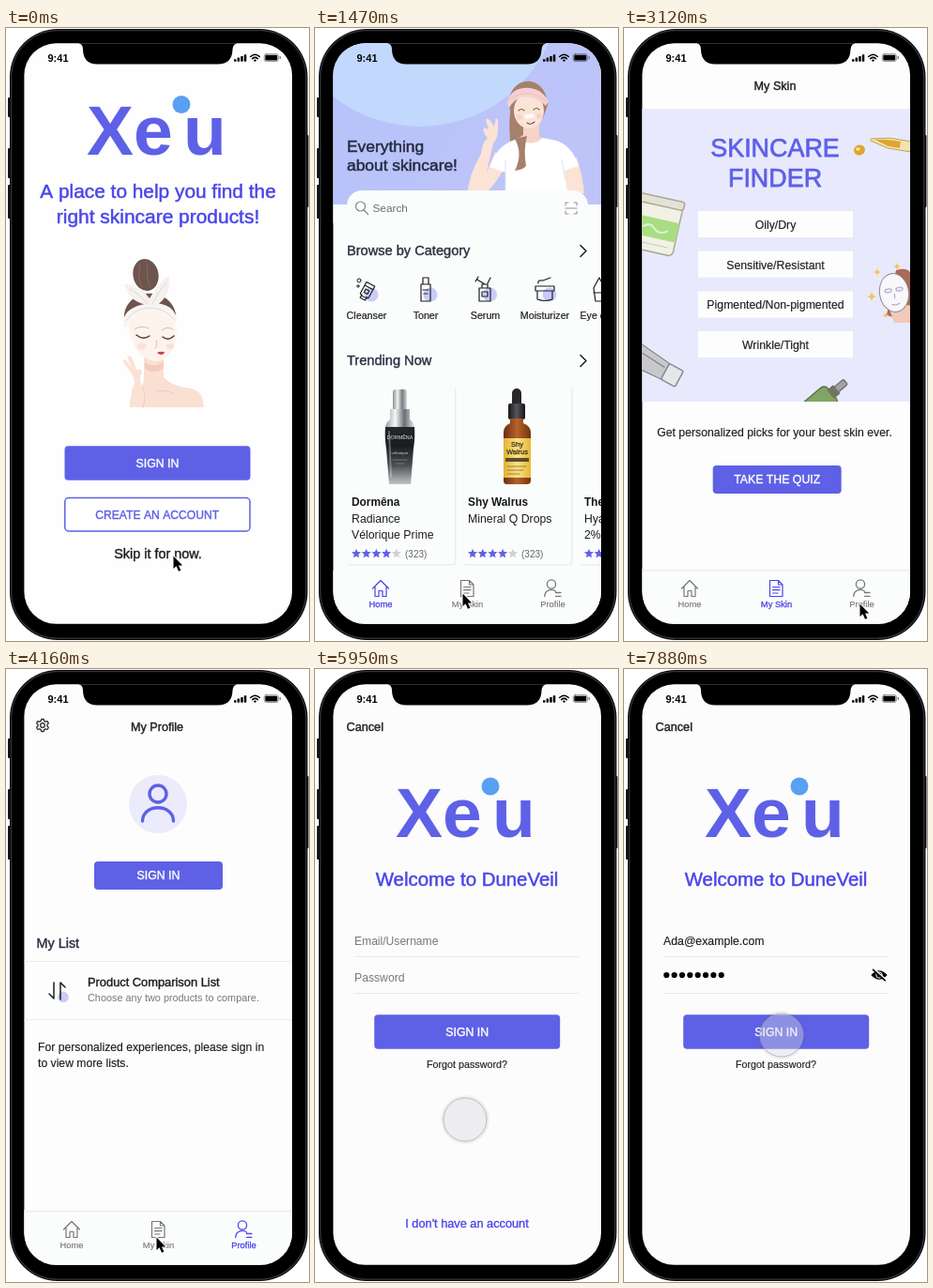
These frames come from a looping animation (323 by 653 pixels, 8 s). An HTML page with a canvas:

```html
<!DOCTYPE html>
<html lang="en">
<head>
<meta charset="utf-8">
<title>Skincare app walkthrough</title>
<style>
html, body { margin: 0; width: 100%; height: 100%; overflow: hidden; background: #fff; }
canvas { display: block; width: 100vw; height: 100vh; }
</style>
</head>
<body>
<canvas id="stage"></canvas>
<script>
const W = 323, H = 653, LOOP = 8000, MID = 162;
const BLUE = '#5e61e6', LINK = '#4a46ea', INK = '#1d1e24', SLATE = '#2c3040', GREY = '#77787d';
const SKIN = '#fbe3d6', LAVENDER = '#c9cbfa', PAPER = '#fbfcfc';
const canvas = document.getElementById('stage');
const ctx = canvas.getContext('2d');
const scale = Math.max(1, window.devicePixelRatio || 1);
canvas.width = W * scale;
canvas.height = H * scale;

// Drawing helpers
function fill(d, color) {
  ctx.fillStyle = color;
  ctx.fill(new Path2D(d));
}
function line(d, color = INK, width = 1.2) {
  ctx.strokeStyle = color;
  ctx.lineWidth = width;
  ctx.lineCap = ctx.lineJoin = 'round';
  ctx.stroke(new Path2D(d));
}
function box(x, y, w, h, r, color, border, width = 1.5) {
  ctx.beginPath();
  ctx.roundRect(x, y, w, h, r);
  if (color) { ctx.fillStyle = color; ctx.fill(); }
  if (border) { ctx.strokeStyle = border; ctx.lineWidth = width; ctx.stroke(); }
}
function oval(x, y, rx, ry, color, turn = 0) {
  ctx.beginPath();
  ctx.ellipse(x, y, rx, ry, turn, 0, Math.PI * 2);
  ctx.fillStyle = color;
  ctx.fill();
}
const dot = (x, y, r, color) => oval(x, y, r, r, color);
function ring(x, y, r, color, width) {
  ctx.beginPath();
  ctx.arc(x, y, r, 0, Math.PI * 2);
  ctx.strokeStyle = color;
  ctx.lineWidth = width;
  ctx.stroke();
}
// "weight" thickens the regular face towards medium
function text(s, x, y, size, color = INK, { weight = 0, bold = false, align = 'left' } = {}) {
  ctx.font = `${bold ? 'bold ' : ''}${size}px "Liberation Sans", Arial, sans-serif`;
  ctx.textAlign = align;
  ctx.fillStyle = ctx.strokeStyle = color;
  ctx.fillText(s, x, y);
  if (weight) {
    ctx.lineWidth = weight;
    ctx.lineJoin = 'round';
    ctx.strokeText(s, x, y);
  }
}
const centered = (s, y, size, color, weight = 0, x = MID) => text(s, x, y, size, color, { weight, align: 'center' });
function placed(x, y, turn, draw) {
  ctx.save();
  ctx.translate(x, y);
  ctx.rotate(turn);
  draw();
  ctx.restore();
}
function gradient(x0, y0, x1, y1, ...colors) {
  const g = ctx.createLinearGradient(x0, y0, x1, y1);
  colors.forEach((c, i) => g.addColorStop(i / (colors.length - 1), c));
  return g;
}
const page = color => box(19, 16, 286, 619, 0, color);
function button(x, y, w, h, label) {
  box(x, y, w, h, 4, BLUE);
  centered(label, y + h / 2 + 4.4, 12.3, '#fff', 0.4, x + w / 2);
}
function wordmark(baseline) {
  text('Xe', 86, baseline, 75, BLUE, { bold: true });
  text('u', 189, baseline, 75, BLUE, { bold: true });
  dot(187, baseline - 53.5, 9.5, '#58a0f1');
}

// Phone shell
function shell() {
  for (const [x, y, h] of [[2, 74, 21], [2, 128, 32], [2, 167, 36], [319, 114, 77]]) box(x, y, 3.5, h, 1, '#15151b');
  box(4, 1, 317.5, 651, 51, '#08080b');
  box(5.7, 2.7, 314, 647.5, 49.5, '#000', '#34343d', 1.2);
}
function statusBar() {
  fill('M78 15H246V16.4Q242 17 241.5 23Q241 38.5 226 38.5H97Q82.5 38.5 82 23Q82 17 78 16.4Z', '#000');
  text('9:41', 44.5, 36, 11, '#000', { bold: true });
  for (let i = 0; i < 4; i++) box(243 + i * 3.6, 33.3 - i * 1.7, 2.5, 2.4 + i * 1.7, 0.6, '#000');
  line('M260.7 30.5Q265.5 26 270.3 30.5M262.7 32.7Q265.5 30.2 268.3 32.7', '#000', 1.6);
  dot(265.5, 34.6, 1.2, '#000');
  ctx.globalAlpha = 0.4;
  box(275.2, 27.7, 15.2, 7.8, 2.2, null, '#000', 1);
  ctx.globalAlpha = 1;
  box(276.3, 28.8, 13, 5.6, 1, '#000');
  box(291.6, 30, 1.3, 3.2, 0.6, '#777');
}
function tabs(active, edge = true) {
  box(19, 578, 286, 57, 0, PAPER);
  if (edge) box(19, 576, 286, 2.5, 0, gradient(0, 576, 0, 578.5, '#fcfcfc', '#e9e9eb'));
  const tint = i => i === active ? LINK : GREY;
  line('M61.5 597L70 588.5L78.5 597M64 595.5V605.5H68V599.5H72V605.5H76V595.5', tint(0), 1.2);
  line('M155.5 588.5H164.5L169 593V605.5H155.5ZM164.5 588.5V593H169M158.5 595.5H166M158.5 598.7H166M158.5 602H164', tint(1), 1.2);
  ring(252, 592.5, 4.6, tint(2), 1.3);
  line('M244.8 605.5C245 597.5 253 597.5 256.5 600M256.5 601.5H262M256.5 605.3H262', tint(2), 1.3);
  ['Home', 'My Skin', 'Profile'].forEach((s, i) => centered(s, 616.5, 9.4, tint(i), i === active ? 0.3 : 0.15, [70, 162.5, 253.5][i]));
}

// Welcome
function bunLady() {
  oval(149, 263, 13.5, 17, '#6d544c', -0.2);
  line('M143 252Q139 266 145 276M151 251Q149 265 153 276', '#846a61', 1);
  fill('M126 310C125 291 142 281 157 283C173 285 183 298 181 312Z', '#6d544c');
  fill('M147 348H168V372Q177 382 197 384Q210 386 211 404H132Q131 390 139 385Q147 382 147 372Z', '#fae0d2');
  fill('M148 356Q158 363 168 355V362Q159 370 148 363Z', '#f2cdbd');
  fill('M131 316C133 304 144 301 156 301C170 301 182 310 182 326C182 342 170 355 160 355C146 355 131 338 131 316Z', '#fef3ec');
  fill('M125 316Q124 302 140 296Q161 289 175 298Q183 304 182 316Q169 302 151 305Q135 307 128 321Z', '#f9f5f2');
  fill('M150 295Q130 291 126 272Q143 274 153 288Q165 268 174 264Q177 284 160 296Z', '#f6f1ee');
  line('M132 278Q143 284 151 294M171 271Q162 281 156 294M128 312Q136 299 152 298Q170 298 180 311', '#d9d0cd', 0.8);
  line('M139 327Q146 333 153 328M167 329Q173 334 179 328', '#4b3a38', 1.4);
  line('M137 321Q144 316 152 320M166 322Q172 317 178 321M160 333Q162 339 159 341', '#c9afa2', 0.8);
  oval(145, 339, 5, 3.5, 'rgba(246,180,170,.3)');
  oval(175, 339, 4, 3, 'rgba(246,180,170,.3)');
  fill('M161 346Q164 344 166 345Q168 344 169 346Q166 350 161 346Z', '#cf3f49');
  fill('M134 385Q139 378 135 370L125 356Q124 352 128 354L134 362L129 350Q132 347 135 353L139 364Q146 362 145 368Q140 372 146 383Q150 393 146 404H133Z', '#fbe2d5');
  line('M146 383Q150 393 146 404M161 387Q172 385 178 389', '#edc5b5', 0.8);
}
function welcome() {
  page('#fefefe');
  wordmark(135);
  centered('A place to help you find the', 181, 20.85, LINK, 0.5);
  centered('right skincare products!', 208, 20.95, LINK, 0.5);
  bunLady();
  button(62.5, 445.2, 198, 36.6, 'SIGN IN');
  box(62.8, 500.6, 197.2, 35.4, 4, '#fff', BLUE);
  centered('CREATE AN ACCOUNT', 522.7, 12.15, BLUE, 0.4, 161.2);
  centered('Skip it for now.', 565, 14.4, INK, 0.4);
}

// Home
function headbandLady() {
  fill('M209 80Q204 118 214 150Q221 155 225 147Q221 128 230 112Z', '#a5806c');
  fill('M207 84C204 50 246 46 248 82L243 96L211 98Z', '#a5806c');
  fill('M192 132L204 145Q190 172 178 178H162Q164 156 177 134Q178 122 184 117Q178 111 180 106L185 108L182 98Q184 95 187 99L191 105L193 96Q196 97 195 105Q196 116 190 123L183 154Z', SKIN);
  fill('M265 140L279 138Q285 156 287 176H268Z', SKIN);
  fill('M222 98H239V115L248 121L230 131L211 121L222 114Z', '#f6d3c4');
  fill('M186 148Q193 128 208 121L217 117Q230 128 243 117L257 120Q274 125 281 147L266 152L269 176H203V154Z', '#fff');
  fill('M213 118Q222 134 213 152Q222 151 225 147Q222 130 226 115Z', '#a5806c');
  line('M203 141V175M263 140L267 162', '#dfe1f1', 1);
  oval(228, 88, 16, 19, SKIN);
  fill('M205 81Q207 66 222 64Q240 62 249 78L246 83Q237 73 222 73Q213 75 207 85Z', '#f5d0d0');
  line('M208 76Q226 62 247 78', '#e8b8bb', 0.7);
  line('M217 88Q220 85 223 88M233 87Q236 84 239 87M226 101Q230 104 234 100', '#7a5548', 1.1);
  fill('M223 93L232 91L234 95L225 97Z', '#fff');
  dot(218, 95, 3, 'rgba(245,165,165,.3)');
  dot(239, 94, 3, 'rgba(245,165,165,.3)');
}
const categoryIcons = {
  Cleanser() {
    placed(56, 279, 0.5, () => line('M-5 -7H5V7Q0 10 -5 7ZM-3 7V11H3V7M-5 -3H5M-2 0H2V4H-2Z'));
    ring(47, 269, 2, INK, 1);
    ring(46, 275, 1.2, INK, 1);
  },
  Toner() { line('M113 273H123V291H113ZM115 266H121V273H115ZM115 279H121M116 283H120'); },
  Serum() { line('M175 277H187V291H175ZM178 277V273H184V277M181 273L173 268M171 270L174 265M184 272L187 266M178 281H184V286H178Z'); },
  Moisturizer() { line('M237 280H253V289Q245 292 237 289ZM235 275H255V280H235ZM238 272Q237 268 243 269L251 266'); },
  'Eye cream'() { line('M297 277L303 266L309 277V291H299ZM297 282H309'); }
};
function star(x, y, color) {
  ctx.beginPath();
  for (let i = 0; i < 10; i++) {
    const a = i * Math.PI / 5 - Math.PI / 2, r = i % 2 ? 2.4 : 5.3;
    ctx.lineTo(x + r * Math.cos(a), y + r * Math.sin(a));
  }
  ctx.fillStyle = color;
  ctx.fill();
}
function productCard(x, brand, first, second = '') {
  ctx.save();
  ctx.shadowColor = 'rgba(60,70,80,.12)';
  ctx.shadowBlur = 2 * scale;
  ctx.shadowOffsetX = ctx.shadowOffsetY = scale;
  box(x, 382, 115, 189, 3, PAPER);
  ctx.restore();
  text(brand, x + 5, 509, 11.85, '#15161a', { bold: true });
  text(first, x + 5, 526.5, 12.3, INK);
  text(second, x + 5, 543.5, 12.3, INK);
  for (let i = 0; i < 5; i++) star(x + 10 + i * 10.7, 560, i < 4 ? BLUE : '#cfd0d4');
  text('(323)', x + 62, 563.5, 10, '#66676c');
}
function blackBottle() {
  box(83, 385, 15, 23, 3, gradient(83, 0, 98, 0, '#8a8d92', '#f4f5f6', '#777a80', '#d7d9db'));
  fill('M80 406H101V417Q106 420 106 427H75Q75 420 80 417Z', gradient(76, 0, 105, 0, '#a0a3a8', '#f6f7f8', '#6a6d72', '#dcdee0'));
  fill('M75 425H106Q107 435 105 448L102 486H79L76 448Q74 435 75 425Z', gradient(0, 425, 0, 486, '#25272b', '#1b1c20', '#4a4c51', '#c2c4c8'));
  line('M79 430L81 478', 'rgba(255,255,255,.3)', 2);
  centered('DORMÊNA', 438, 5.4, '#e4e4e6', 0, 90.5);
  centered('velorique', 454, 4.4, '#d4d5d8', 0, 90.5);
  line('M83 460H98M86 464H95', '#85888d', 0.7);
}
function amberBottle() {
  box(210, 384, 10, 18, [5, 5, 1, 1], '#28282c');
  box(206, 400, 18, 17, 2, gradient(206, 0, 224, 0, '#17171a', '#55565a', '#151518'));
  fill('M208 416H222V421Q230 424 230 431V482Q230 486 226 486H204Q201 486 201 482V431Q201 424 208 421Z', gradient(201, 0, 230, 0, '#6c2f10', '#b5622c', '#74340f'));
  box(201, 437, 29, 42, 0, gradient(201, 0, 230, 0, '#e3b235', '#fae487', '#e5b637'));
  centered('Shy', 446, 7.5, '#4a351c', 0.3, 215.5);
  centered('Walrus', 454, 7.5, '#4a351c', 0.3, 215.5);
  box(203, 458, 25, 4, 0, '#5a4b2c');
  line('M205 467H225M205 471H222M205 475H218', '#8b6b28', 0.8);
}
function sectionTitle(s, y) {
  text(s, 34, y, 14.6, SLATE, { weight: 0.4 });
  line(`M283 ${y - 10.5}L289 ${y - 4.5}L283 ${y + 1.5}`, INK, 1.5);
}
function home() {
  page(PAPER);
  box(19, 16, 286, 172, 0, gradient(40, 16, 260, 188, '#b6c3fa', '#bfc4f8'));
  dot(112, -45, 150, '#c2d8fd');
  headbandLady();
  box(19, 188, 286, 20, 0, PAPER);
  text('Everything', 34, 132, 17.4, '#262b42', { weight: 0.5 });
  text('about skincare!', 34, 152, 17.4, '#262b42', { weight: 0.5 });
  box(34, 173, 257, 37, 16, PAPER);
  ring(48.5, 190, 5, '#85868b', 1.2);
  line('M52.2 194L56.5 198.5', '#85868b');
  text('Search', 61.5, 196, 11.8, '#6c6d72');
  line('M267 189V186H270M276 186H279V189M279 195V198H276M270 198H267V195M267 192H279', '#97989d', 1.1);
  sectionTitle('Browse by Category', 242);
  Object.entries(categoryIcons).forEach(([label, draw], i) => {
    const x = [55, 118, 181.5, 245, 308][i];
    dot(x + 5, 284, 7.5, LAVENDER);
    draw();
    centered(label, 310, 10.7, INK, 0.2, x);
  });
  sectionTitle('Trending Now', 359);
  productCard(34, 'Dormêna', 'Radiance', 'Vélorique Prime');
  productCard(158, 'Shy Walrus', 'Mineral Q Drops');
  productCard(282, 'The Arbor', 'Hyaluronic', '2% + B5');
  blackBottle();
  amberBottle();
  tabs(0, false);
}

// Skin finder
function sparkle(x, y, r) {
  fill(`M${x} ${y - r}Q${x} ${y} ${x + r} ${y}Q${x} ${y} ${x} ${y + r}Q${x} ${y} ${x - r} ${y}Q${x} ${y} ${x} ${y - r}Z`, '#f1c74f');
}
function finderDecor() {
  placed(35, 211, 0.22, () => {
    box(-23, -27, 46, 55, 5, '#f1f1e5', '#a9a798');
    box(-23, -8, 46, 21, 0, '#a9dd83');
    box(-24, -31, 48, 9, 3, '#e4e2d2', '#a9a798');
    line('M-14 3Q-8 -3 -2 3T12 3', '#dff3cf', 2);
    line('M-15 20H16', '#cccab9', 1);
  });
  placed(38, 362, 0.5, () => {
    fill('M-30 -13L7 -9V10L-30 12Z', '#c7c8cb');
    line('M-30 -13L7 -9V10L-30 12M-24 -5L4 -3', '#77787c', 1);
    box(7, -9, 17, 19, 2, '#e6e7e9', '#898a8f');
  });
  oval(251, 130, 6, 5.5, '#dfa631', -0.3);
  oval(249.5, 129, 2.3, 1.8, '#fae6a0');
  placed(263, 118, 0.16, () => {
    fill('M0 -1L20 -4H46V7H20L0 2Z', '#f3e3b2');
    fill('M4 0L20 -2H32V5H20Z', '#dda52f');
    line('M0 0L20 -4H46M0 2L20 7H46', '#c39b45', 0.9);
  });
  fill('M290 258Q305 254 306 264V314L280 306Z', '#a96a5b');
  fill('M283 300Q294 292 306 296V314H288Z', '#f0c9b7');
  placed(288, 282, -0.15, () => {
    oval(0, 0, 16, 21, '#8f8790');
    oval(0, 0, 15, 20, '#f8f7fb');
    for (const x of [-6, 6]) {
      oval(x, -3, 4.2, 2.5, '#aaa4bd');
      oval(x, -3, 3.2, 1.5, '#e9e9fd');
    }
    line('M0 1V6M-4 12Q0 14 4 12', '#aaa4b5', 1);
  });
  sparkle(264, 286, 6);
  sparkle(270, 260, 5);
  sparkle(291, 254, 5);
  sparkle(279, 306, 4);
  placed(217, 393, 0.87, () => {
    box(-12, -6, 24, 40, 5, '#82a565', '#5e7848');
    box(-6, -13, 12, 9, 1, '#71745f');
    box(-3.5, -25, 7, 13, 2, '#a3a3a3', '#777');
  });
}
function finder() {
  page('#fdfdfd');
  centered('My Skin', 66, 12.6, INK, 0.4, 161);
  box(19, 86, 286, 312, 0, '#e9e9fe');
  ctx.save();
  ctx.beginPath();
  ctx.rect(19, 86, 286, 312);
  ctx.clip();
  finderDecor();
  ctx.restore();
  centered('SKINCARE', 137, 26.9, BLUE, 0.75, 161);
  centered('FINDER', 169, 26.9, BLUE, 0.75, 161);
  ['Oily/Dry', 'Sensitive/Resistant', 'Pigmented/Non-pigmented', 'Wrinkle/Tight'].forEach((s, i) => {
    const y = 195 + i * 42.7;
    box(79, y, 165, 28, 0, '#fdfdfd');
    centered(s, y + 19, 12.3, INK, 0.15, 161.5);
  });
  centered('Get personalized picks for your best skin ever.', 434.5, 12.25, INK, 0.15, 160.5);
  button(94.7, 466, 137, 30, 'TAKE THE QUIZ');
  tabs(1);
}

// Profile
function gear(x, y) {
  ctx.beginPath();
  for (let i = 0; i <= 96; i++) {
    const a = i / 96 * Math.PI * 2, r = 5.8 + 0.9 * Math.tanh(3 * Math.cos(6 * a));
    ctx.lineTo(x + r * Math.sin(a), y + r * Math.cos(a));
  }
  ctx.strokeStyle = INK;
  ctx.lineWidth = 1.2;
  ctx.stroke();
  ring(x, y, 2.3, INK, 1.2);
}
function profile() {
  page('#fdfdfd');
  gear(39, 60);
  centered('My Profile', 66, 12.6, INK, 0.4, 161);
  dot(162, 144, 31, '#ebebfc');
  ring(162, 133, 9, BLUE, 3.4);
  line('M145.5 162C145.5 143 178.5 143 178.5 162', BLUE, 3.4);
  button(94, 205, 137, 30, 'SIGN IN');
  text('My List', 32.5, 297, 14.4, SLATE, { weight: 0.4 });
  line('M19 311.5H305M19 373.5H305', '#ececee', 1);
  dot(61, 349.5, 5.8, LAVENDER);
  line('M51 334V350M46 346L51 351L51 334M58 352V334L63 339', INK, 1.5);
  text('Product Comparison List', 87, 337.5, 12.85, INK, { weight: 0.4 });
  text('Choose any two products to compare.', 87, 354, 10.87, GREY);
  text('For personalized experiences, please sign in', 34, 407, 12.2, INK, { weight: 0.15 });
  text('to view more lists.', 34, 424, 12.2, INK, { weight: 0.15 });
  tabs(2);
}

// Sign in
function signIn(filled) {
  page('#fcfcfc');
  text('Cancel', 33.5, 66, 12.7, INK, { weight: 0.4 });
  wordmark(178.5);
  centered('Welcome to DuneVeil', 231, 20.4, LINK, 0.5);
  line('M42 306.5H281M42 345.5H281', '#e9e9eb', 1);
  if (filled) {
    text('Ada@example.com', 42, 294, 12.3, INK, { weight: 0.15 });
    for (let i = 0; i < 8; i++) dot(45.3 + i * 8.35, 326, 3.1, '#000');
    fill('M263.3 326Q272 316.5 280.7 326Q272 335.5 263.3 326Z', '#000');
    ring(272, 326, 3.2, '#fcfcfc', 1);
    line('M266.8 319.8L279.4 331', '#fcfcfc', 1.6);
    line('M265.5 320.3L278.3 331.8', '#000', 1.6);
  } else {
    text('Email/Username', 42, 294, 12.1, GREY);
    text('Password', 42, 332.5, 12.2, GREY);
    centered("I don't have an account", 595, 12.75, LINK, 0.35);
  }
  button(63.2, 368.2, 198, 36.6, 'SIGN IN');
  centered('Forgot password?', 425, 10.75, INK, 0.15);
}

// Pointers
function arrow(x, y) {
  placed(x, y, 0, () => {
    const d = 'M0.5 0.5V14L3.6 11.2L6 16.8L8.4 15.8L6 10.4H10.2Z';
    line(d, '#fff', 1.8);
    fill(d, '#000');
  });
}
function touch(x, y) {
  dot(x, y, 26, 'rgba(90,90,110,.06)');
  dot(x, y, 24.5, 'rgba(90,90,110,.06)');
  dot(x, y, 23, 'rgba(245,245,252,.32)');
  ring(x, y, 23, 'rgba(165,165,175,.65)', 1);
}

const scenes = [
  [0, welcome], [140, home], [1920, finder], [3570, profile],
  [4460, finder], [5950, () => signIn(false)], [7280, () => signIn(true)]
];
// Each run: start, interval, pointer, then stops held for one interval each
const hidden = () => {};
const runs = [
  [0, 440, arrow, [178, 562]],
  [440, 147, hidden, [0, 0]],
  [587, 147, arrow, [157, 403], [172, 430], [182, 452], [190, 505], [192, 575], [142, 591], [157, 602]],
  [2220, 300, hidden, [0, 0]],
  [2520, 150, arrow, [177, 511], [239, 561], [246, 588], [250, 606], [251, 613]],
  [3570, 147, arrow, [251, 613], [234, 611], [199, 608], [170, 606], [160, 605]],
  [4460, 150, arrow, [160, 605], [161, 570], [162, 521]],
  [4910, 1490, touch, [160, 480]],
  [6400, 147, touch, [145, 380], [129, 306], [122, 294], [120, 290]],
  [7280, 150, touch, [120, 290], [193, 318], [188, 354], [175, 380], [168, 390]]
];
const latest = (list, t) => list.findLast(entry => entry[0] <= t);

function draw(t) {
  ctx.setTransform(scale, 0, 0, scale, 0, 0);
  ctx.fillStyle = '#fff';
  ctx.fillRect(0, 0, W, H);
  shell();
  ctx.save();
  ctx.beginPath();
  ctx.roundRect(19.4, 16.3, 285.6, 618.5, 34);
  ctx.clip();
  latest(scenes, t)[1]();
  statusBar();
  const [start, interval, pointer, ...stops] = latest(runs, t);
  pointer(...stops[Math.min(stops.length - 1, Math.floor((t - start) / interval))]);
  ctx.restore();
}
let origin;
function tick(now) {
  origin ??= now;
  draw((now - origin) % LOOP);
  requestAnimationFrame(tick);
}
draw(0);
requestAnimationFrame(tick);
</script>
</body>
</html>
```
